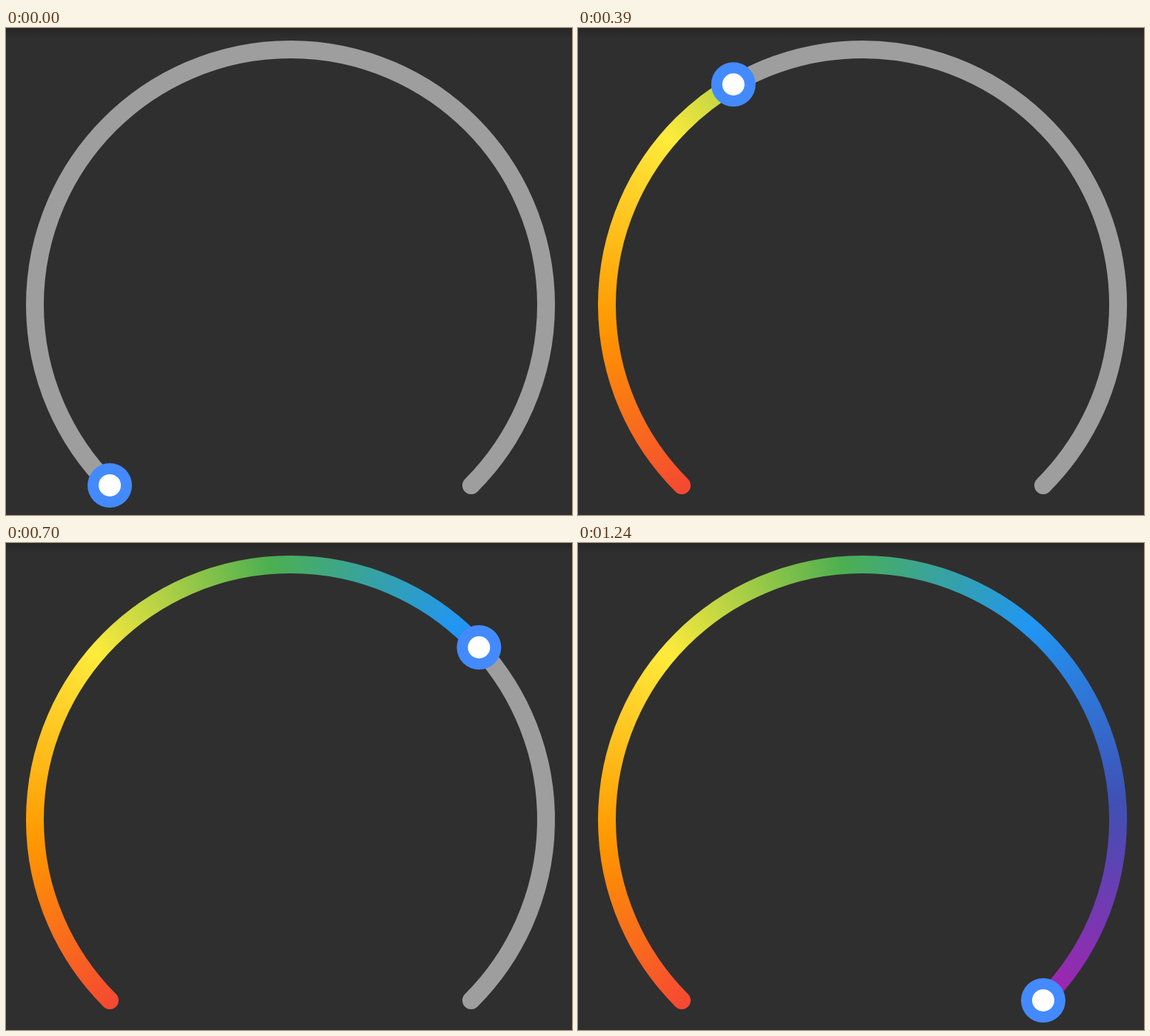
An HTML page with a canvas that plays this animation: 764x658 px, repeating every 1300 ms.

```html
<!DOCTYPE html>
<html lang="en">
<head>
<meta charset="utf-8">
<title>Gauge</title>
<style>
html, body { margin: 0; width: 100%; height: 100%; overflow: hidden; background: #2f2f2f; }
canvas { display: block; width: 764px; height: 658px; }
</style>
</head>
<body>
<canvas id="stage" width="764" height="658"></canvas>
<script>
const W = 764, H = 658, LOOP = 1300;
const CX = 384, CY = 374, R = 345, WIDTH = 24;
const rad = deg => deg * Math.PI / 180;
const START = rad(135), SWEEP = rad(270);
const ctx = document.getElementById('stage').getContext('2d');

// Colours run clockwise, one every 45 degrees, starting just before the round cap.
const hues = ['#f44336', '#ff9800', '#ffeb3b', '#4caf50', '#2196f3', '#3f51b5', '#9c27b0'];
const rainbow = ctx.createConicGradient(START - rad(4.5), CX, CY);
hues.forEach((hue, i) => rainbow.addColorStop(i / 8, hue));
rainbow.addColorStop(1, hues[6]);

const shade = ctx.createLinearGradient(0, 0, 0, 14);
shade.addColorStop(0, 'rgba(0,0,0,.2)');
shade.addColorStop(0.5, 'rgba(0,0,0,.1)');
shade.addColorStop(1, 'rgba(0,0,0,0)');

// Nearly constant speed: [step, share of the arc]
const path = [[0, 0.071], [7, 0.2725], [14, 0.474], [21, 0.676], [26, 0.8238], [32, 0.9945], [33, 1]];

function progress(ms) {
  if (ms < 60) return 0;
  // 30 ms steps; the step that begins at 480 lasts 40 ms
  const step = ms < 520 ? Math.min(14, Math.floor((ms - 60) / 30)) : 15 + Math.floor((ms - 520) / 30);
  const i = path.findIndex(([s]) => s > step);
  if (i < 0) return 1;
  const [s0, p0] = path[i - 1], [s1, p1] = path[i];
  return p0 + (p1 - p0) * (step - s0) / (s1 - s0);
}

function arc(from, to, style) {
  ctx.beginPath();
  ctx.arc(CX, CY, R, from, to);
  ctx.strokeStyle = style;
  ctx.stroke();
}

function dot(x, y, r, fill) {
  ctx.beginPath();
  ctx.arc(x, y, r, 0, 2 * Math.PI);
  ctx.fillStyle = fill;
  ctx.fill();
}

function draw(ms) {
  const p = progress(ms), angle = START + SWEEP * p;
  const x = CX + R * Math.cos(angle), y = CY + R * Math.sin(angle);
  ctx.fillStyle = '#2f2f2f';
  ctx.fillRect(0, 0, W, H);
  ctx.lineWidth = WIDTH;
  ctx.lineCap = 'round';
  if (p < 1) arc(angle, START + SWEEP, '#9e9e9e');
  if (p > 0) arc(START, angle, rainbow);
  dot(x, y, 30, '#448aff');
  dot(x, y, 15, '#fff');
  ctx.fillStyle = shade;
  ctx.fillRect(0, 0, W, 14);
}

const begin = performance.now();
function tick() {
  draw((performance.now() - begin) % LOOP);
  requestAnimationFrame(tick);
}
tick();
</script>
</body>
</html>
```
